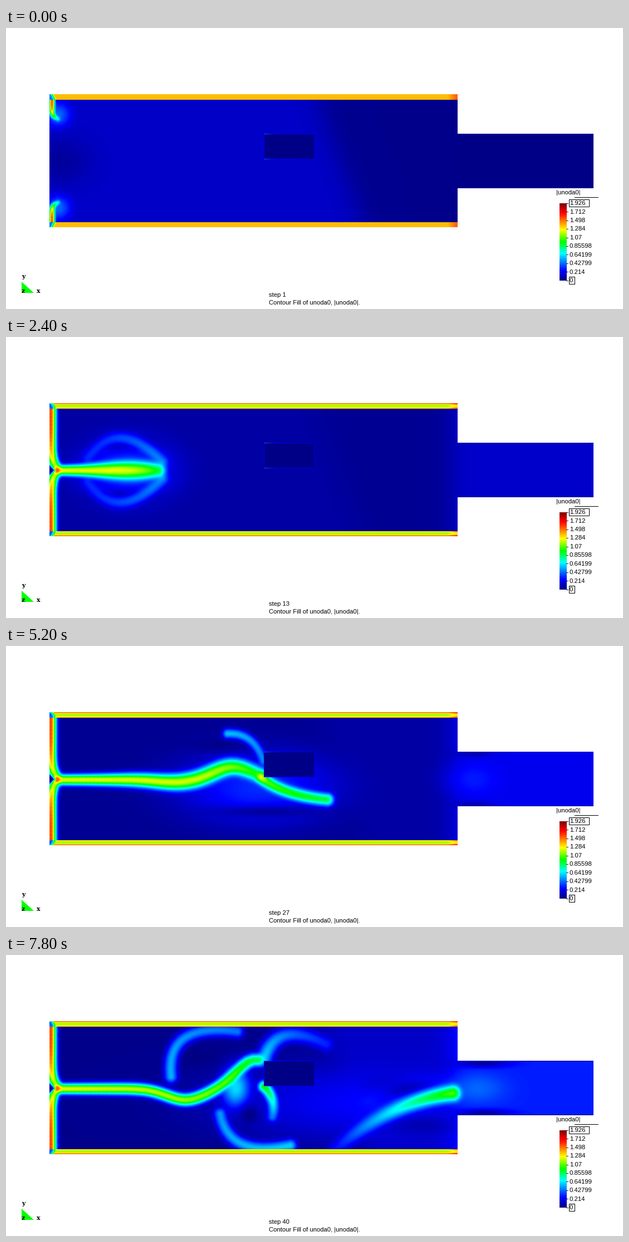
Recreate the animation shown at these times as a matplotlib script. Size 1108 px wide and 505 px high, loop 8 s.

```python
import numpy as np
import matplotlib
import matplotlib.pyplot as plt
from matplotlib.animation import FuncAnimation
from matplotlib.colors import LinearSegmentedColormap
from matplotlib.patches import Polygon, Rectangle

matplotlib.rcParams["font.family"] = "Liberation Sans"
W, H, DPI = 1108, 505, 100
PT = 72 / DPI
X0, Y0, X1, Y1 = 78, 119, 1055, 358
STEPS, VMAX, MID, FADE = 40, 1.92596, 239, 3

CMAP = LinearSegmentedColormap.from_list("speed", list(zip(
    (0, .125, .35, .5, .66, .88, 1),
    ("navy", "blue", "cyan", "lime", "yellow", "red", "maroon"))))

# coarse grid, every second pixel
GX = np.arange(X0, X1, 2.0)
GY = np.arange(Y0, Y1, 2.0)[:, None]
PX = np.arange(X0, X1)
PY = np.arange(Y0, Y1)[:, None]
INSIDE = (PX < 811) | ((PY >= 190) & (PY < 288))

glows, darks, bends = [], [], []


def add(group, *keys, mirror=False):
    """Keys are (step, values...); y sits at every odd place of `ys`."""
    track = np.array(keys, float)
    group.append(track)
    if mirror:
        flip = track.copy()
        ys = [2, 4, 6] if group is bends else [2]
        flip[:, ys] = 2 * MID - flip[:, ys]
        group.append(flip)


def pose(track, step):
    """Interpolated values and a visibility that fades at both ends."""
    s = track[:, 0]
    values = [np.interp(step, s, col) for col in track.T[1:]]
    shown = min(1 + (step - s[0]) / FADE, 1 + (s[-1] - step) / FADE)
    return values, float(np.clip(shown, 0, 1))


def ramp(step, steps, values):
    return np.interp(step, steps, values)


def bell(z):
    return np.exp(-.5 * z ** 2)


def blob(track, step):
    (x, y, rx, ry, a), shown = pose(track, step)
    return a * shown * bell((GX - x) / rx) * bell((GY - y) / ry)


def stroke(x, y, a, w):
    """Soft line through the points with varying strength and width."""
    run = np.concatenate([[0], np.cumsum(np.hypot(np.diff(x), np.diff(y)))])
    at = np.linspace(0, run[-1], int(run[-1] / (.4 * np.min(w))) + 2)
    buf = np.zeros((len(GY), len(GX)))
    for px, py, pa, pw in zip(*(np.interp(at, run, c) for c in (x, y, a, w))):
        r = 3.5 * pw
        cx = slice(max(0, int((px - X0 - r) / 2)), int((px - X0 + r) / 2) + 2)
        cy = slice(max(0, int((py - Y0 - r) / 2)), int((py - Y0 + r) / 2) + 2)
        part = buf[cy, cx]
        np.maximum(part, pa * bell((GY[cy] - py) / pw) * bell((GX[cx] - px) / pw), out=part)
    return buf


def bend(track, step):
    """Quadratic curve: three points, strength at both ends, width."""
    (ax, ay, bx, by, cx, cy, a0, a1, w), shown = pose(track, step)
    if shown == 0:
        return 0
    t = np.linspace(0, 1, 24)
    p, q, r = (1 - t) ** 2, 2 * t * (1 - t), t ** 2
    return stroke(p * ax + q * bx + r * cx, p * ay + q * by + r * cy,
                  shown * (a0 + (a1 - a0) * t), w + 0 * t)


def wall_stream(step):
    front = min(128 + 32 * step, 232)
    t = np.linspace(0, 1, 12)
    x = 80 + 11 * t ** 8 + 2 * (step < 4)
    y = 126 + (front + 3 - 126) * t
    drop = .5 if step >= 4 else 1
    w = ramp(step, (1, 6), (4, 7))
    return stroke(x, y, 1.6 - drop * t ** 3, w + 0 * t)


def main_jet(step):
    tip = ramp(step, (4, 9, 17, 23, 31, 35, 40), (95, 182, 362, 460, 460, 412, 452))
    x = np.linspace(92, tip, 40)
    t = (x - 92) / (tip - 92)
    keys = (23, 31, 35, 40)
    dip = ramp(step, keys, (0, 9, 24, 20))
    dip_x = ramp(step, keys, (290, 318, 398, 322))
    rise = ramp(step, keys, (4, 42, 0, 52))
    rise_x = ramp(step, keys, (410, 404, 445, 448))
    y = MID + ramp(step, (9, 23), (0, 1))
    y = y + dip * bell((x - dip_x) / 34) - rise * bell((x - rise_x) / 34)
    swell = ramp(step, (4, 9, 17, 23, 31), (0, .4, 1, 1, 0))
    hump = swell * bell((t - .72) / .25)
    a = 1.27 - .15 * t - .25 * t ** 6 + .12 * hump
    return stroke(x, y, a, 7 + 2 * t + 7 * hump)


# flow leaving the jet below the block
add(bends,
    (23, 460, 236, 485, 252, 507, 255, 1.1, .8, 8),
    (31, 455, 236, 510, 284, 646, 296, 1.05, 1, 10),
    (35, 468, 236, 530, 375, 715, 283, .5, 1, 10),
    (40, 590, 350, 690, 262, 802, 248, .25, 1.05, 12))
# curl above its head
add(bends,
    (31, 653, 276, 640, 212, 588, 246, .5, .3, 9),
    (40, 800, 235, 710, 200, 650, 262, .2, .15, 14))
add(bends, (40, 463, 236, 485, 258, 478, 290, 1, .45, 8))
add(bends, (35, 402, 263, 444, 245, 430, 165, .85, .6, 9))
# start-up vortex pair
add(bends,
    (9, 188, 222, 125, 105, 112, 205, .48, .32, 9),
    (17, 372, 225, 275, 180, 180, 230, .42, .25, 11), mirror=True)
# flow turned up at the block, rolling back along the top wall
add(bends,
    (23, 462, 228, 460, 195, 460, 162, .5, .7, 5),
    (31, 461, 185, 430, 115, 335, 152, .42, .45, 9),
    (35, 430, 175, 405, 95, 303, 176, .8, .5, 8),
    (40, 415, 137, 285, 120, 296, 218, .45, .55, 9))
add(bends,
    (31, 470, 134, 525, 130, 497, 164, .3, .3, 6),
    (40, 463, 186, 485, 115, 575, 160, .6, .3, 11))
# roll on the lower wall
add(bends,
    (31, 450, 310, 480, 330, 515, 338, .33, .33, 15),
    (40, 384, 285, 400, 365, 510, 342, .5, .6, 9))

# haze around the jet
add(glows,
    (4, 100, MID, 22, 22, .2),
    (9, 155, MID, 55, 45, .3),
    (17, 280, 238, 90, 52, .34),
    (23, 385, 238, 95, 55, .34),
    (31, 520, 270, 130, 45, .28),
    (40, 640, 265, 200, 55, .24))
add(glows,
    (17, 270, 155, 45, 28, .23),
    (23, 390, 148, 55, 28, .25), mirror=True)
add(glows,
    (31, 402, 222, 22, 16, .55),
    (35, 380, 212, 32, 24, .45),
    (40, 412, 238, 20, 28, .62))
add(glows,
    (17, 830, MID, 40, 30, .15),
    (40, 845, MID, 55, 28, .36))
add(glows,
    (1, 93, 156, 20, 20, .42),
    (4, 102, 210, 25, 22, .4), mirror=True)

# slow cores
add(darks,
    (9, 138, 186, 18, 9, .85),
    (17, 278, 191, 55, 7, .75),
    (23, 388, 184, 48, 6, .7),
    (31, 385, 174, 25, 10, .7),
    (40, 345, 183, 25, 11, .7))
add(darks,
    (9, 138, 292, 18, 9, .85),
    (17, 278, 285, 55, 7, .75),
    (23, 395, 281, 65, 6, .75),
    (31, 540, 313, 75, 8, .7),
    (40, 745, 305, 45, 12, .5))
add(darks,
    (31, 610, 249, 14, 9, .8),
    (35, 660, 247, 28, 9, .75),
    (40, 715, 235, 38, 12, .65))
add(darks, (40, 437, 287, 12, 12, .9))
add(darks, (1, 95, MID, 40, 30, .6))
add(darks,
    (23, 835, 193, 20, 4, .5),
    (40, 858, 194, 32, 5, .8), mirror=True)


def sigmoid(z):
    return 1 / (1 + np.exp(-np.clip(z, -40, 40)))


def base(step):
    left = ramp(step, (1, 9, 17, 40), (.14, .09, .05, .03))
    right = ramp(step, (1, 23, 40), (.03, .05, .14))
    out = ramp(step, (1, 9, 23, 40), (.02, .13, .19, .29))
    v = left + (right - left) * sigmoid((GX - 560 - .36 * (GY - 129)) / 14)
    return v + (out - v) * sigmoid((GX - 800) / 12)


def enlarge(c):
    """Double the grid with linear in-between values."""
    for _ in range(2):
        big = np.empty((2 * len(c) - 1, c.shape[1]))
        big[::2] = c
        big[1::2] = (c[:-1] + c[1:]) / 2
        c = big.T
    return c


def draw_walls(v, step):
    settled = ramp(step, (1, 7), (0, 1))
    x = np.arange(811 - X0)
    depth = np.arange(10)[:, None]
    r = depth / 4.5 - 1
    band = 1.38 + settled * (.25 * r ** 2 + .1 * (depth < 2) - .22)
    band = band + .15 * np.clip((x - 715) / 15, 0, 1)
    band = band * np.clip((x + 3 - depth / 2) / 11, .33, 1)
    v[:10, :len(x)] = band
    v[:-10:-1, :len(x)] = band[:9]


def draw_block(v):
    top, bottom, left, right = 190 - Y0, 235 - Y0, 463 - X0, 553 - X0
    v[top:bottom + 1, left:right + 1] = .02
    edge = .2 + .25 * np.exp(-np.arange(right - left + 1) / 12)
    v[top, left:right + 1] = v[bottom, left:right + 1] = edge
    v[top:bottom + 1, left] = .22
    v[top:bottom + 1, right] = .15


def field(step):
    cube = base(step) ** 3
    for track in glows:
        cube = cube + blob(track, step) ** 3
    for track in darks:
        cube = cube * (1 - blob(track, step)) ** 3
    for track in bends:
        cube = cube + bend(track, step) ** 3
    side = wall_stream(step)
    cube = cube + side ** 3 + side[::-1] ** 3
    if step >= 4:
        cube = cube + main_jet(step) ** 3
    v = enlarge(np.cbrt(cube))
    if step >= 4:
        v *= 1 - .95 * np.clip(1.6 - (PX - X0) / 8 - np.abs(PY - MID) / 6, 0, 1)
    draw_walls(v, step)
    draw_block(v)
    v[190 - Y0, 811 - X0:] = v[287 - Y0, 811 - X0:] = .04
    return v


def picture(step):
    rgba = CMAP(np.clip(field(step) / VMAX, 0, 1))
    rgba[..., 3] = INSIDE
    return rgba


fig = plt.figure(figsize=(W / DPI, H / DPI), dpi=DPI, facecolor="white")
ax = fig.add_axes([0, 0, 1, 1])
ax.axis("off")


def label(x, y, s, size=11.2, **kw):
    return ax.text(x, y, s, fontsize=size * PT, color="black", va="baseline", **kw)


def frame_box(x, y, w, h):
    ax.add_patch(Rectangle((x + .5, y + .5), w, h, fill=False, ec="black", lw=PT))


image = ax.imshow(picture(1), extent=(X0, X1, Y1, Y0), interpolation="nearest",
                  aspect="auto")
ax.imshow(np.linspace(1, 0, 139)[:, None], extent=(994, 1007, 454, 315), cmap=CMAP,
          interpolation="nearest", aspect="auto")
ax.set_xlim(0, W)
ax.set_ylim(H, 0)

for i in range(10):
    y = 314.3 + 15.4 * i
    label(1012, y + 4, f"{VMAX * (9 - i) / 9:.5g}")
    ax.plot([1006, 1009], [y + .7, y + .7], color="black", lw=.6)
frame_box(1010, 307, 36, 13)
frame_box(1010, 446, 10, 13)
label(988, 299, "|unoda0|")
ax.plot([1021, 1063], [303.5, 303.5], color="black", lw=PT)

ax.add_patch(Polygon([(28, 456), (28, 476), (50, 476)], fc="lime", ec="none"))
for x, y, s in ((28, 450, "y"), (28, 476, "z"), (55, 476, "x")):
    label(x, y, s, 11, family="DejaVu Serif", weight="bold")

counter = label(472, 483, "step 1")
label(472, 497, "Contour Fill of unoda0, |unoda0|.")


def draw(i):
    image.set_data(picture(i + 1))
    counter.set_text(f"step {i + 1}")
    return image, counter


anim = FuncAnimation(fig, draw, frames=STEPS, init_func=lambda: draw(0),
                     interval=200, repeat=True, repeat_delay=0, blit=False)
plt.show()
```
